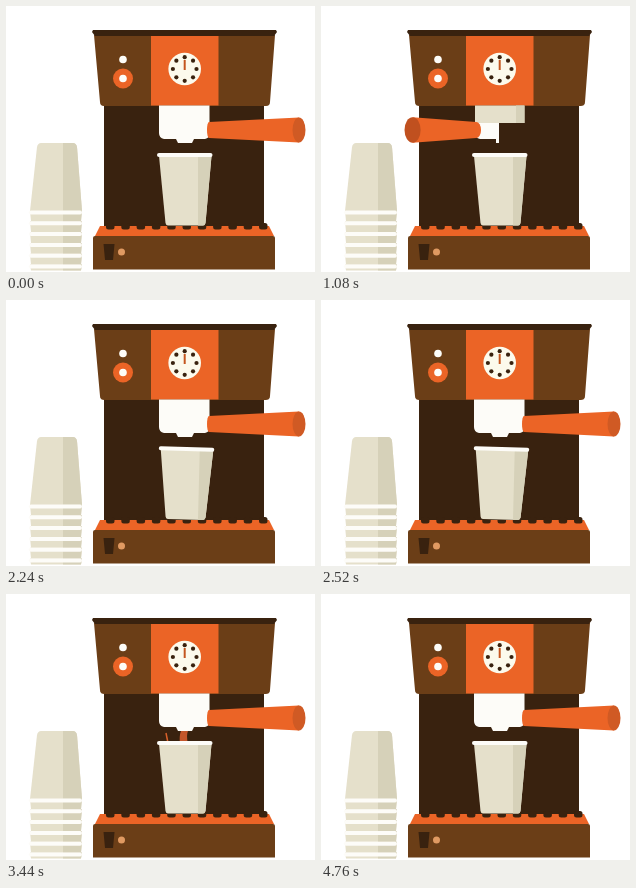
Animation, 309 px wide and 266 px high, one loop 4.8 s. Source, as an HTML page:

```html
<!DOCTYPE html>
<html lang="en">
<head>
<meta charset="utf-8">
<title>Espresso machine</title>
<style>
  html, body { margin: 0; width: 100%; height: 100%; overflow: hidden; background: #fff; }
  svg { display: block; width: 100vw; height: 100vh; }
  .dark { fill: #39220f; }
  .brown { fill: #6b3e17; }
  .orange { fill: #eb6426; }
  .cream { fill: #e5e0cb; }
  .shade { fill: #d6d1b9; }
  .pale { fill: #fdfcf8; }
</style>
</head>
<body>
<svg viewBox="0 0 309 266">
  <g id="stack">
    <path class="cream" d="M35 137H67Q70 137 71 141L76 205H24L31 141Q32 137 35 137Z"/>
    <path class="shade" d="M57 137H67Q70 137 71 141L76 205H57Z"/>
  </g>

  <path class="dark" d="M98 97H258V224H98Z"/>
  <path class="brown" d="M88 29H269L264 96Q264 100 260 100H98Q94 100 94 96Z"/>
  <path class="orange" d="M145 29H212.500V99.500H145Z"/>
  <path class="dark" d="M87 24H270L271 26L268 30H89L86 26Z"/>
  <circle class="pale" cx="117" cy="53.500" r="3.800"/>
  <circle class="orange" cx="117" cy="72.500" r="10"/>
  <circle class="pale" cx="117" cy="72.500" r="3.800"/>
  <g id="clock">
    <circle cx="178.700" cy="63" r="16.300" fill="#fcfaec"/>
    <path d="M178.700 54V64" stroke="#c4561f" stroke-width="2"/>
  </g>

  <path class="orange" d="M94 220H263L268 230H89Z"/>
  <g id="teeth" class="dark"></g>
  <path class="brown" d="M89 230H267Q269 230 269 232V263.500H87V232Q87 230 89 230Z"/>
  <path class="dark" d="M97.500 238H108.500L107 254H99Z"/>
  <circle cx="115.500" cy="246" r="3.500" fill="#e09a62"/>

  <g id="pour">
    <path d="M175 137H182Q180 141 182 150H174Q173 142 175 137Z" fill="#c4562a"/>
    <path d="M160 139L162 149" stroke="#d9602a" stroke-width="1.500"/>
  </g>
  <g id="headFull" class="pale">
    <path d="M153 99.500H203.500V128Q203.500 132 199 133H188L186 137H172L170 133H158Q153 132 153 127Z"/>
  </g>
  <g id="headOpen">
    <path class="pale" d="M154 116H178V137H175V133H159Q154 132 154 127Z"/>
    <path class="cream" d="M154 99.500H203.500V117H154Z"/>
    <path class="shade" d="M195 99.500H203.500V117H195Z"/>
  </g>
  <g id="cup">
    <path class="cream" d="M153 150H205.500L199.500 217Q199 219.500 197 219.500H162Q160 219.500 159.500 217Z"/>
    <path class="shade" d="M192 150H205.500L199.500 217Q199 219.500 197 219.500H192Z"/>
    <rect class="pale" x="151" y="147" width="55.500" height="4" rx="2"/>
  </g>
  <g id="handle">
    <ellipse id="neck" class="orange" cy="124" ry="8"/>
    <path id="shaft" class="orange"/>
    <ellipse id="knob" cy="124"/>
  </g>
</svg>
<script>
  const LOOP = 4800, PIVOT = 175, MID = 124, REACH = 135;
  const $ = id => document.getElementById(id);

  function add(parent, tag, attrs) {
    const el = document.createElementNS('http://www.w3.org/2000/svg', tag);
    set(el, attrs);
    parent.appendChild(el);
  }
  function set(el, attrs) {
    for (const key in attrs) el.setAttribute(key, attrs[key]);
  }
  function ease(t, from, to) {
    const p = Math.min(1, Math.max(0, (t - from) / (to - from)));
    return (1 - Math.cos(Math.PI * p)) / 2;
  }
  const show = (id, on) => { $(id).style.display = on ? '' : 'none'; };

  for (let i = 0; i < 8; i++) {
    const a = i * Math.PI / 4;
    add($('clock'), 'circle', {
      class: 'dark', r: 2.1,
      cx: 178.7 + 11.8 * Math.sin(a), cy: 63 - 11.8 * Math.cos(a)
    });
  }
  for (let i = 0; i < 11; i++) {
    add($('teeth'), 'rect', { x: 100 + i * 15.3, y: 217, width: 8.5, height: 6.5, rx: 2.5 });
  }
  for (let i = 0; i < 6; i++) {
    const y = 204.5 + i * 10.8, h = Math.min(10.8, 264.5 - y);
    add($('stack'), 'path', { class: 'cream', d: `M24 ${y}H76L75 ${y + h}H25Z` });
    add($('stack'), 'path', { class: 'shade', d: `M57 ${y}H76L75 ${y + h}H57Z` });
    add($('stack'), 'rect', { class: 'pale', x: 23, y, width: 53, height: 4, rx: 2 });
  }

  function drawHandle(t) {
    const deg = REACH * (ease(t, 0, 732) - ease(t, 1300, 2099));
    const a = deg * Math.PI / 180, c = Math.cos(a), s = Math.sin(a);
    const near = PIVOT + 28 * c, far = PIVOT + 118 * c;
    const r = 12.5 + 2.5 * s ** 8;
    set($('neck'), { cx: near, rx: 2 + 4 * s });
    set($('shaft'), {
      d: `M${near} ${MID - 8}L${far} ${MID - r}V${MID + r}L${near} ${MID + 8}Z`
    });
    set($('knob'), {
      cx: far, rx: 6.5 + (r - 6.5) * s ** 4, ry: r,
      fill: s > 0.3 ? '#c0501f' : '#d05a24'
    });
  }

  function draw(now) {
    const t = now % LOOP;
    drawHandle(t);
    const open = t >= 1000 && t < 1760;
    show('headOpen', open);
    show('headFull', !open);
    show('pour', t >= 3360 && t < 4440);
    const tilt = t > 2150 && t < 3070 ? 2.5 * Math.sin((t - 2150) / 920 * 2 * Math.PI) : 0;
    set($('cup'), { transform: `rotate(${tilt} 180 219)` });
  }

  const start = performance.now();
  function tick() {
    draw(performance.now() - start);
    requestAnimationFrame(tick);
  }
  tick();
</script>
</body>
</html>
```
